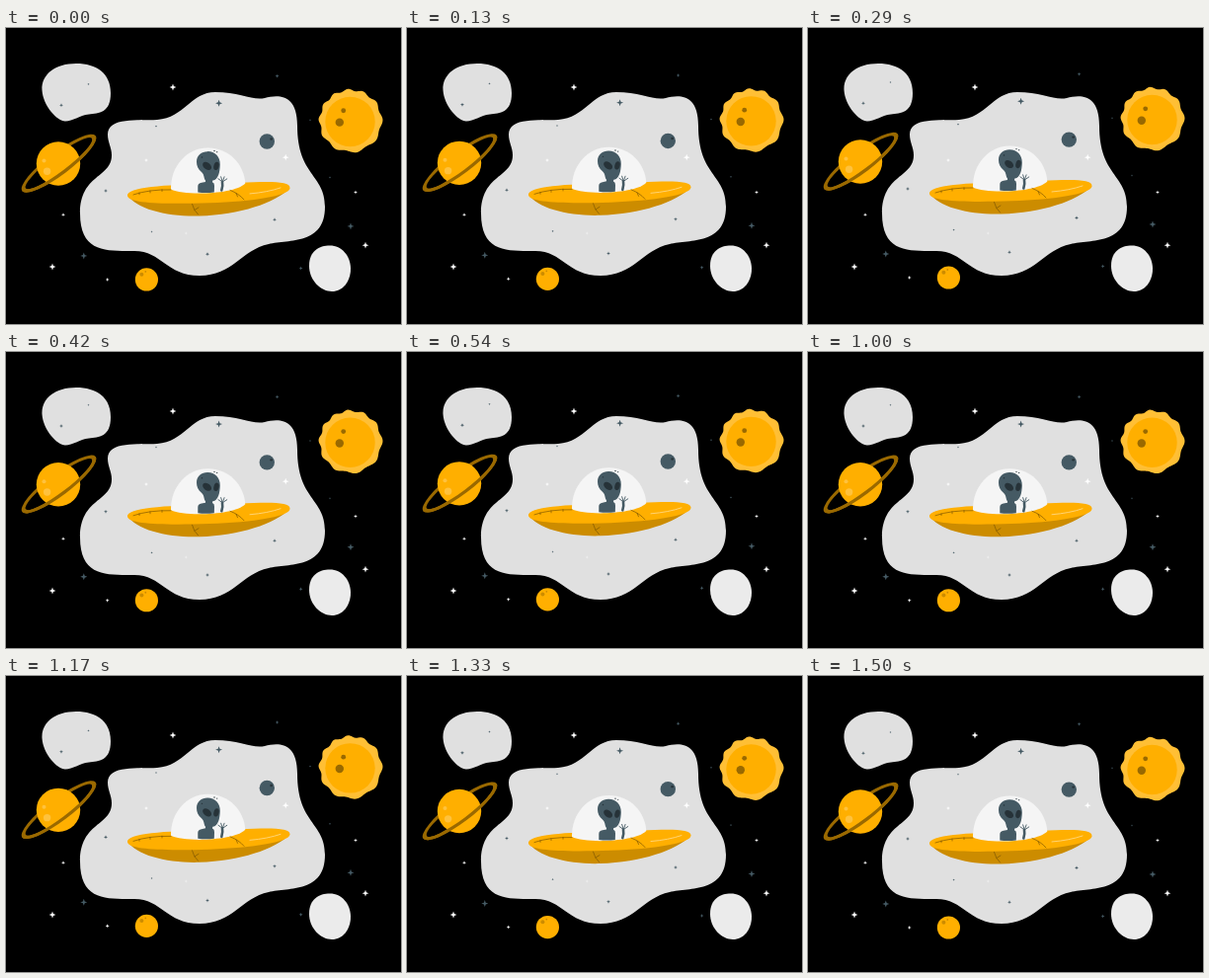
Animation, 400 px wide and 300 px high, one loop 1540 ms. Source, as an HTML page:

```html
<!DOCTYPE html>
<html>
<head>
<meta charset="utf-8">
<title>Saucer in space</title>
<style>
  html, body { margin: 0; width: 100%; height: 100%; overflow: hidden; background: #000; }
  svg { display: block; width: 100vw; height: 100vh; }
</style>
</head>
<body>
<svg viewBox="0 0 400 300">
  <defs>
    <clipPath id="front"><rect x="-50" y="0" width="100" height="20"/></clipPath>
    <path id="ring" fill="#9a6900" fill-rule="evenodd"
      d="M-46.5 0A46.5 11.5 0 1 1 46.5 0A46.5 11.5 0 1 1 -46.5 0Z M-42 0A42 8.2 0 1 0 42 0A42 8.2 0 1 0 -42 0Z"/>
  </defs>

  <g id="still">
    <path fill="#e0e0e0" d="M103 108C103 90 134 94 153 93C181 91 187 65 212 65S250 74 262 71S295 65 295 99
      C295 150 323 148 323 181C323 220 287 214 266 219C238 225 230 251 196 251S158 226 130 226
      S75 228 75 188S107 152 107 129C107 121 103 116 103 108Z"/>
    <path fill="#e0e0e0" d="M36.5 63C35.500 47 50 36 71 36S106 46 106 66S94 86.500 84 87.500S68 94.500 60 94.500S37.500 79 36.500 63Z"/>
    <path fill="#ebebeb" d="M328 220.500C340 220.500 349 231 349 244S341 267 330 267S307 256 307 241S317 220.500 328 220.500Z"/>
  </g>

  <g id="drift">
    <path id="corona" fill="#ffbf35"/>
    <circle cx="348.5" cy="95" r="25.2" fill="#ffaf00"/>
    <g fill="#996900">
      <circle cx="341.7" cy="83.8" r="2.4"/>
      <circle cx="337.8" cy="95.7" r="4.2"/>
    </g>

    <g transform="translate(53.5 137.3) rotate(-37)"><use href="#ring"/></g>
    <circle cx="53" cy="137.5" r="22.2" fill="#ffaf00"/>
    <g fill="#ffc23d">
      <circle cx="41.6" cy="145.3" r="3.7"/>
      <circle cx="38.5" cy="134.5" r="2"/>
    </g>
    <g transform="translate(53.5 137.3) rotate(-37)"><use href="#ring" clip-path="url(#front)"/></g>

    <circle cx="142.4" cy="255" r="11.6" fill="#ffaf00"/>
    <g fill="#cc8c00">
      <circle cx="137.4" cy="249.7" r="2"/>
      <circle cx="141.3" cy="247" r="0.9"/>
    </g>

    <circle cx="264.3" cy="115.1" r="7.7" fill="#455a64"/>
    <circle cx="268.6" cy="112.6" r="1.2" fill="#263238"/>

    <g id="saucer">
      <path fill="#cc8c00" d="M123 169C132 184 165 191.500 196 190.500C236 189.300 273 177.500 287.500 162Z"/>
      <path fill="#ffaf00" d="M123 170C122 161 162 159 205 158S288 152.500 287.500 162C288 170 250 175.800 206 177.300S123.500 178 123 170Z"/>
      <path fill="#f5f5f5" d="M167 163.500C166.500 140 183 121.500 204.500 121.500C226 121.500 241 138 242.300 157.500C232 168.500 181 170.500 167 163.500Z"/>
      <g fill="none" stroke="#805800" stroke-width="0.7" stroke-linecap="round">
        <path d="M129 169Q145 163.500 167 164M135 167v1.800M146 165v2M158 163.800v1.800"/>
        <path d="M227 164.500Q236 168 241 174M233 167.500l1.500 3.500"/>
        <path d="M188.500 178.500Q190 185 194.500 189M191 184.500l4-2.500"/>
      </g>
      <path d="M247 168Q265 166.500 278 162" fill="none" stroke="#ffd780" stroke-width="0.9" stroke-linecap="round"/>
      <g fill="#455a64">
        <path d="M204 125.200C211.500 125 217 130.500 216.800 138.500C216.600 146 215 153.800 209.500 154.500L203 155C200 154.500 201.500 149 198 146C194.500 143 193 139.500 193 135.500C193 129 198 125.300 204 125.200Z"/>
        <path d="M202 152L209.500 152L209 156.200Q211.200 157 211 160L210.800 166.500Q202 167.500 194.300 166.500L194.300 160.500Q194.300 157.500 198 156.800L202 156Z"/>
      </g>
      <g fill="#263238">
        <ellipse cx="203.600" cy="140" rx="5" ry="3.400" transform="rotate(38 203.600 140)"/>
        <ellipse cx="213" cy="140" rx="2.600" ry="4.200" transform="rotate(14 213 140)"/>
        <circle cx="211" cy="124.600" r="0.700"/>
        <circle cx="213.700" cy="125.700" r="0.600"/>
        <circle cx="198.500" cy="131" r="0.700"/>
      </g>
      <g fill="none" stroke="#455a64" stroke-linecap="round">
        <path d="M218.300 164.500Q219.800 160 219 156" stroke-width="2.600"/>
        <path id="fingers" stroke-width="0.900"/>
      </g>
    </g>
  </g>
</svg>
<script>
  const LOOP = 1540, LEAD = 60, LIFT = 4.7, TAU = 2 * Math.PI;
  const get = id => document.getElementById(id);

  // Eleven ripples around the sun, crowded towards the upper right.
  function coronaPath(cx, cy) {
    const points = [];
    for (let i = 0; i < 150; i++) {
      const a = i / 150 * TAU;
      const r = 31.4 + 1.1 * Math.cos(11 * a + 2.44 * Math.cos(a - 1) - 0.2);
      points.push([cx + r * Math.sin(a), cy - r * Math.cos(a)].map(v => v.toFixed(2)));
    }
    return 'M' + points.join('L') + 'Z';
  }

  function fingersPath(x, y) {
    let d = '';
    for (let i = 0; i < 4; i++) {
      const a = -0.95 + i * 0.64;
      d += `M${x} ${y}l${5.4 * Math.sin(a)} ${-5.4 * Math.cos(a)}`;
    }
    return d;
  }

  function stars(parent, before, fill, r, places) {
    const q = r * 0.26, s = r - q;
    const d = places.map(([x, y]) =>
      `M${x} ${y - r}l${q} ${s}l${s} ${q}l${-s} ${q}l${-q} ${s}l${-q} ${-s}l${-s} ${-q}l${s} ${-q}Z`);
    const path = document.createElementNS('http://www.w3.org/2000/svg', 'path');
    path.setAttribute('d', d.join(''));
    path.setAttribute('fill', fill);
    parent.insertBefore(path, before);
  }

  const still = get('still'), drift = get('drift'), saucer = get('saucer');
  get('corona').setAttribute('d', coronaPath(349, 94.2));
  get('fingers').setAttribute('d', fingersPath(219.3, 156));

  stars(still, null, '#fff', 3.4, [[169, 60], [47, 242], [364, 220.2], [283.2, 131.2]]);
  stars(still, null, '#fff', 2, [[58, 189.2], [354, 166.5], [142, 134]]);
  stars(still, null, '#efefef', 1.6, [[182.3, 208]]);
  stars(drift, saucer, '#fff', 2, [[102.7, 255]]);
  stars(drift, saucer, '#455a64', 3.5, [[215.6, 76.3], [78.8, 231], [349, 201]]);
  stars(drift, saucer, '#455a64', 2, [[101, 165], [272, 194.4], [204, 229.2], [274.6, 48.7], [298.6, 243.5], [56, 78.3]]);
  stars(drift, saucer, '#455a64', 1.2, [[152, 99.7], [147.6, 206.6], [83.5, 57], [308, 93.3], [328, 151.5]]);

  function draw(ms) {
    const y = -LIFT * (1 - Math.cos((ms + LEAD) / LOOP * TAU)) / 2;
    drift.setAttribute('transform', `translate(0 ${y.toFixed(3)})`);
  }

  let start;
  function tick(now) {
    if (start === undefined) start = now;
    draw((now - start) % LOOP);
    requestAnimationFrame(tick);
  }
  draw(0);
  requestAnimationFrame(tick);
</script>
</body>
</html>
```
